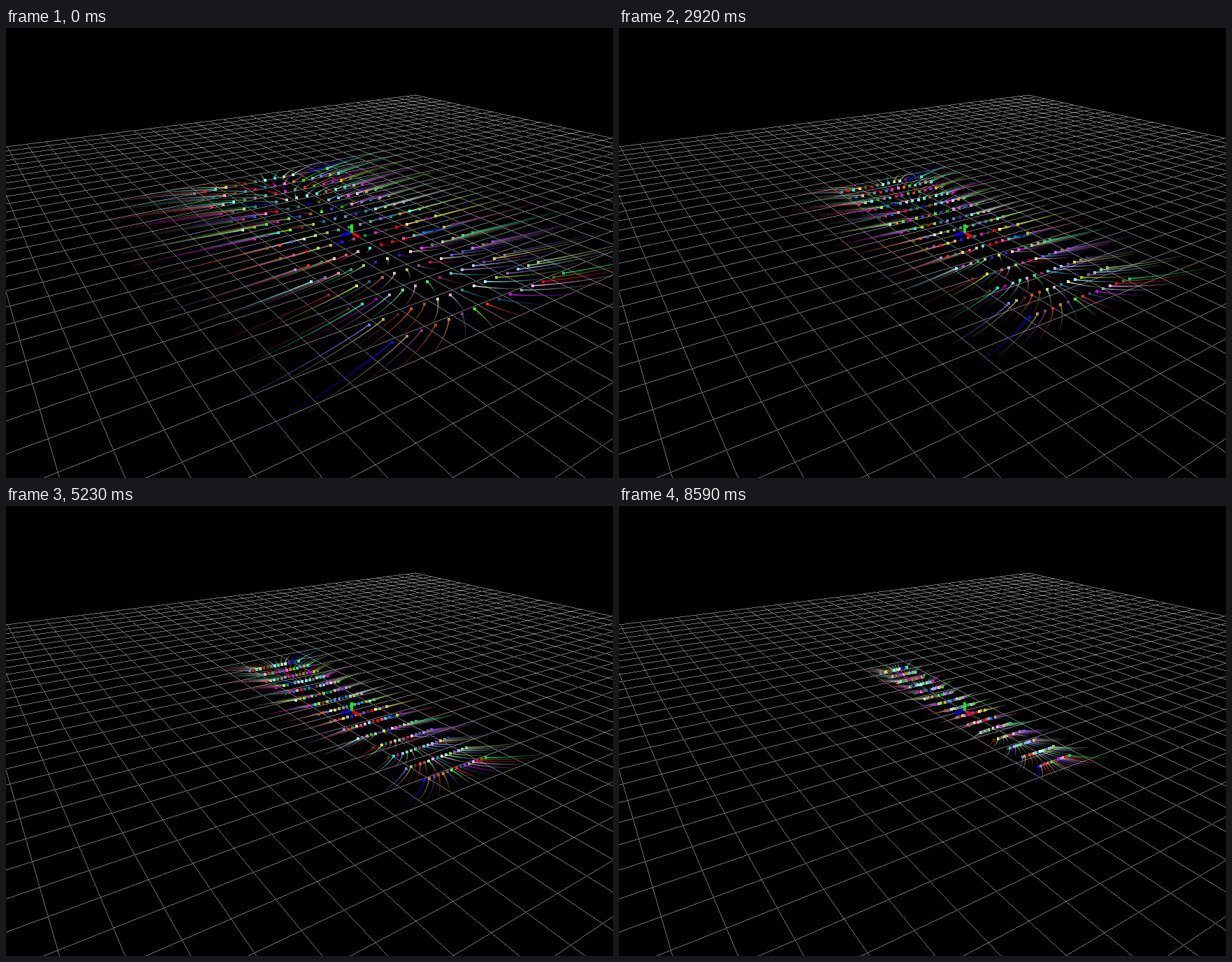
Animation, 869 px wide and 644 px high, one loop 8.78 s. Source, as an HTML page with a canvas:

```html
<!DOCTYPE html>
<html lang="en">
<head>
<meta charset="utf-8">
<title>Particle field</title>
<style>
  html, body { margin: 0; width: 100%; height: 100%; overflow: hidden; background: #000; }
  canvas { display: block; }
</style>
</head>
<body>
<canvas id="stage" width="869" height="644"></canvas>
<script>
const W = 869, H = 644, LOOP = 8780, STEPS = 39;
const ctx = document.getElementById('stage').getContext('2d');

// Ground plane: origin on screen, horizon, two vanishing points, depth per cell
const ORIGIN = { x: 494.5, y: 293 };
const HORIZON = -60, VP_A = 1821, VP_B = -126;
const RATE_A = 0.02423, RATE_B = 0.0377;
const GRID = { a0: -19, a1: 21, b0: -20, b1: 20 };

// A square lattice of particles, squeezed towards the b axis
const SIDE = 15, FIRST = -6.5;
const SPACING_A = 0.491, SPACING_B = 0.939;
const DECAY_A = 0.197, DECAY_B = 0.0354;
const TRAIL = 4.3, SEGMENTS = 22;

function project(a, b) {
  const p = a * RATE_A, q = b * RATE_B, w = 1 + p + q;
  return [
    (ORIGIN.x + p * VP_A + q * VP_B) / w,
    (ORIGIN.y + (p + q) * HORIZON) / w
  ];
}

function random(seed) {
  return () => {
    seed = (seed + 0x6D2B79F5) | 0;
    let t = Math.imul(seed ^ (seed >>> 15), 1 | seed);
    t = (t + Math.imul(t ^ (t >>> 7), 61 | t)) ^ t;
    return ((t ^ (t >>> 14)) >>> 0) / 4294967296;
  };
}

function makeParticles() {
  const rnd = random(7);
  const channel = () => Math.round(rnd() * 255);
  const list = [];
  for (let row = 0; row < SIDE; row++) {
    for (let col = 0; col < SIDE; col++) {
      list.push({
        a: (FIRST + col) * SPACING_A,
        b: (FIRST + row) * SPACING_B,
        color: `rgb(${channel()},${channel()},${channel()})`
      });
    }
  }
  return list;
}

// One hard pixel per step along the longer direction
function pixelLine(c, [x0, y0], [x1, y1]) {
  const flat = Math.abs(x1 - x0) > Math.abs(y1 - y0);
  const [u0, v0, u1, v1] = flat ? [x0, y0, x1, y1] : [y0, x0, y1, x1];
  const slope = (v1 - v0) / (u1 - u0);
  const first = Math.max(0, Math.round(Math.min(u0, u1)));
  const last = Math.min(flat ? W : H, Math.round(Math.max(u0, u1)));
  for (let u = first; u <= last; u++) {
    const v = Math.floor(v0 + (u + 0.5 - u0) * slope);
    if (flat) c.fillRect(u, v, 1, 1);
    else c.fillRect(v, u, 1, 1);
  }
}

function makeGrid() {
  const layer = document.createElement('canvas');
  layer.width = W;
  layer.height = H;
  const c = layer.getContext('2d');
  const near = 0.1;
  c.fillStyle = '#000';
  c.fillRect(0, 0, W, H);
  c.fillStyle = '#6c6c6c';
  for (let a = GRID.a0; a <= GRID.a1; a++) {
    const b = Math.max(GRID.b0, (near - 1 - a * RATE_A) / RATE_B);
    pixelLine(c, project(a, b), project(a, GRID.b1));
  }
  for (let b = GRID.b0; b <= GRID.b1; b++) {
    const a = Math.max(GRID.a0, (near - 1 - b * RATE_B) / RATE_A);
    pixelLine(c, project(a, b), project(GRID.a1, b));
  }
  return layer;
}

const particles = makeParticles();
const grid = makeGrid();

function place(p, t) {
  return project(p.a * Math.exp(-DECAY_A * t), p.b * Math.exp(-DECAY_B * t));
}

function line(from, to) {
  ctx.beginPath();
  ctx.moveTo(from[0], from[1]);
  ctx.lineTo(to[0], to[1]);
  ctx.stroke();
}

function drawTrail(p, t) {
  ctx.strokeStyle = p.color;
  let from = place(p, t - TRAIL);
  for (let i = 1; i <= SEGMENTS; i++) {
    const k = i / SEGMENTS;
    const to = place(p, t - TRAIL * (1 - k));
    ctx.globalAlpha = 0.2 + 0.7 * k;
    ctx.lineWidth = 1 + 0.8 * k;
    line(from, to);
    from = to;
  }
  ctx.globalAlpha = 1;
}

function drawHead(p, t) {
  const [x, y] = place(p, t);
  ctx.fillStyle = p.color;
  ctx.fillRect(Math.round(x) - 2, Math.round(y) - 2, 4, 4);
}

function drawAxes() {
  const axis = (color, x, y) => {
    ctx.strokeStyle = color;
    line([495, 293], [x, y]);
  };
  ctx.lineWidth = 4;
  axis('#f00', 506, 299);
  axis('#00f', 480, 296.5);
  axis('#0f0', 495, 281);
}

function draw(t) {
  ctx.drawImage(grid, 0, 0);
  for (const p of particles) drawTrail(p, t);
  for (const p of particles) drawHead(p, t);
  drawAxes();
}

let shown = -1;
const start = performance.now();

function tick() {
  const now = (performance.now() - start) % LOOP;
  const step = Math.floor(now / LOOP * STEPS);
  if (step !== shown) {
    shown = step;
    draw(step / STEPS * LOOP / 1000);
  }
  requestAnimationFrame(tick);
}
tick();
</script>
</body>
</html>
```
